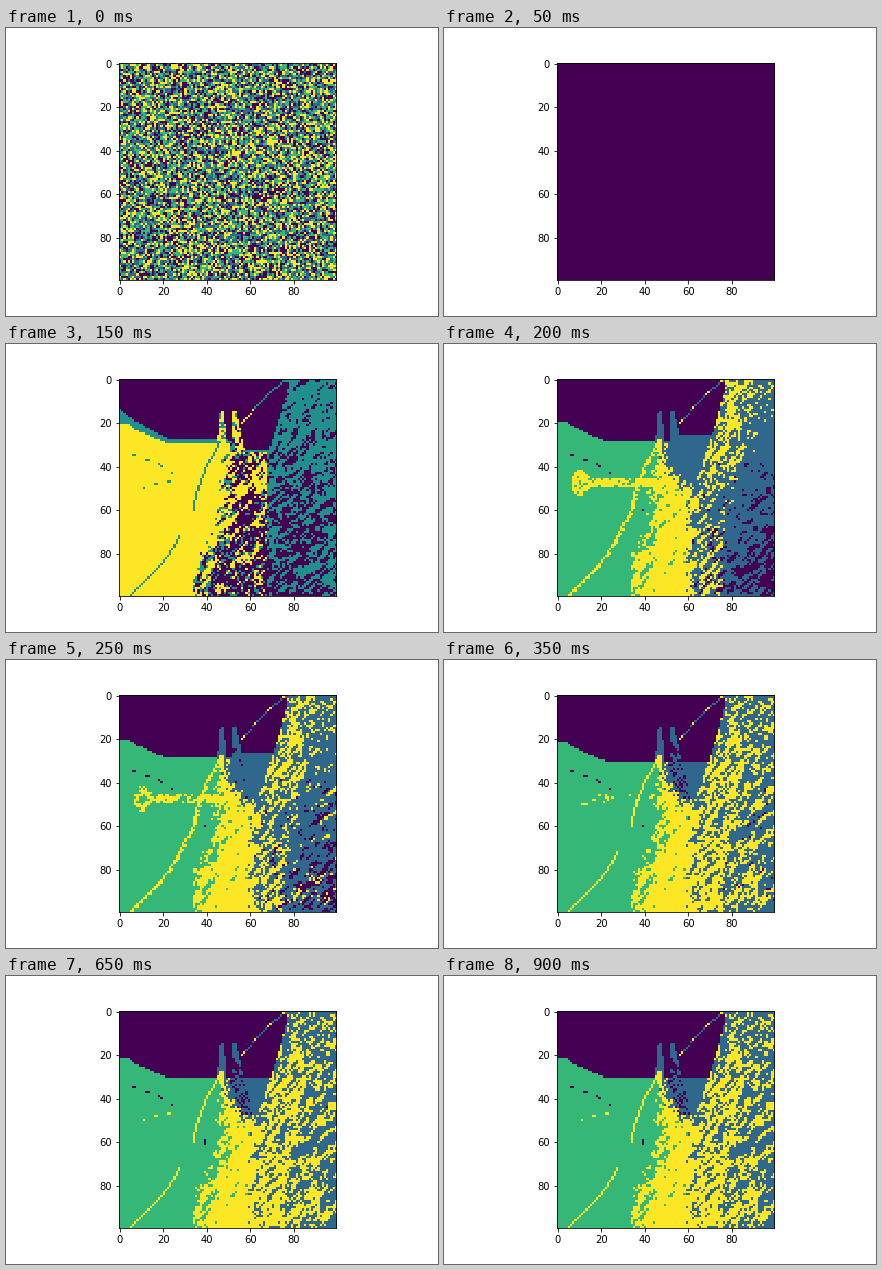
Recreate the animation shown at these times as a matplotlib script. Size 432 px wide and 288 px high, loop 1 s.

```python
import numpy as np
import matplotlib.pyplot as plt
from matplotlib.animation import FuncAnimation

SIZE, FRAMES, INTERVAL = 100, 20, 50
SKY, HAZE, MEADOW, SCRUB = range(4)
rng = np.random.RandomState(7)
Y, X = np.mgrid[:SIZE, :SIZE]


def ramp(v, start, end):
    return np.clip((v - start) / (end - start), 0, 1)


def mix(a, b, t):
    return a + (b - a) * t


def streaks(length, lean):
    """Slanted noise, ranked so that its values spread evenly over 0..1."""
    white = rng.randn(SIZE, SIZE)
    white = white + 0.6 * np.roll(white, 1, 1)
    smear = sum(np.roll(white, (k, -round(k * lean)), (0, 1)) for k in range(length))
    field = 0.5 * rng.randn(SIZE, SIZE) + smear / np.sqrt(length)
    return field.ravel().argsort().argsort().reshape(field.shape) / field.size


def steep_line(top, bottom, column):
    return (X == np.round(column)) & (Y >= top) & (Y <= bottom)


scatter = rng.randint(0, 4, (SIZE, SIZE))
grain, patch = streaks(4, 0.5), streaks(3, 0.8)
fleck = rng.rand(SIZE, SIZE)

# Outlines of the scene
cliff = np.maximum(58, 77 - 15 * (Y / 50) ** 1.3)
rock = X > cliff
horizon = 22 + 8.5 * ramp(X, 4, 22) ** 0.8
haze_end = 48 - 0.07 * (60 - X) ** 2 + 8 * (grain - 0.5)
scrub_edge = 47 - 14 * ramp(Y, 66, 99) ** 1.3
spread = 6 + 14 * ramp(Y, 45, 99)
open_ground = (X >= 34) & (Y > 32)

below_tip = Y - 14
left_tower = (abs(X - 46.7) < 0.6 + 0.1 * below_tip) & (Y > 14) & (Y < 31)
right_tower = (abs(X - 52 - 0.15 * below_tip) < 1 + 0.08 * below_tip) & (Y > 14) & (Y < 36)
towers = left_tower | right_tower
shadow = (abs(X - 51 - 0.27 * (Y - 22)) < 3) & (Y > 21) & (Y < 48)

upper_cable = (Y == np.round(20 * ramp(X, 77, 56) ** 1.2)) & (X > 55) & (X < 78)
mid_cable = steep_line(29, 60, 34 + 12 * ramp(Y, 60, 29) ** 1.6)
gap_cable = steep_line(60, 72, mix(34, 27, ramp(Y, 60, 72)))
low_cable = steep_line(72, 99, 27 - 22 * ramp(Y, 72, 99) ** 1.35)
dark_specks = (Y == np.round(35 + 8 * ramp(X, 6, 24) ** 1.5)) & (X % 6 < 2) & (X > 5) & (X < 25)
light_specks = (Y == np.round(52 - X / 4.5)) & (X % 6 > 3) & (X > 10) & (X < 24)


def three_groups():
    lab = np.full((SIZE, SIZE), 2)
    bright = mix(0.62, 0.24, ramp(Y, 35, 58))
    rough = open_ground & (grain < np.clip(0.5 + (X - scrub_edge - 1) / spread, 0, 1 - bright))
    teal = mix(0.6, 0.2, ramp(X - scrub_edge, 0, 8))
    lab[rough] = (fleck < teal)[rough]

    face = X > np.maximum(cliff, 67)
    share = mix(0.74, 0.36, ramp(Y, 10, 70)) + 0.2 * ramp(X, 75, 99)
    lab[face] = (patch < share)[face]

    band_top = 13.5 + 14 * ramp(X, 0, 22) ** 0.8 + 5 * ramp(X, 48, 58)
    lab[(Y < horizon - 1 + 4 * (X > 50)) & ~rock] = 1
    lab[(Y < band_top) & ~rock] = 0
    lab[towers] = np.where(fleck < 0.6, 2, 1)[towers]
    lab[shadow & (fleck > 0.7)] = 0
    lab[upper_cable | mid_cable | low_cable | dark_specks | light_specks] = 1
    lab[upper_cable & (X < 62)] = 2
    return lab


def four_groups(settled, n):
    fresh = 1 - settled
    lab = np.full((SIZE, SIZE), MEADOW)
    ground = np.clip(0.5 + (X - scrub_edge + 2 * fresh) / spread, 0, 0.95)
    lab[(grain < ground) & open_ground] = SCRUB

    early = 0.07 + 0.58 * np.exp(-(np.maximum(X - cliff, 0) / 16) ** 2)
    late = mix(0.78, 0.38, ramp(X, 62, 95)) * mix(0.65, 1, ramp(Y, 0, 30))
    face = rock & (X + 5 * (fleck - 0.5) > 58)
    lab[face] = np.where(grain < mix(early, late, settled), SCRUB, HAZE)[face]
    dark = 0.55 * ramp(X + 0.7 * Y, 95, 168) ** 2 * fresh
    lab[face & (Y > 38) & (patch < dark) & (lab == HAZE)] = SKY

    # A bright strip of meadow shrinks to a few specks.
    strip = abs(Y - 47.5) < 2 + 4 * np.exp(-((X - 10) / 4) ** 2)
    lab[strip & (X > 6) & (X < 46) & (patch < 0.62 * fresh)] = SCRUB

    haze = (X > 46) & (Y < haze_end) & ~rock
    lab[haze] = np.where((X < 51) & (fleck > 0.5), SCRUB, HAZE)[haze]
    lab[(Y < horizon - fresh * (1.5 + 2 * (X > 54))) & ~rock] = SKY
    lab[towers] = HAZE
    lab[shadow & (fleck < mix(0.08, 0.4, settled))] = SKY
    lab[(abs(X - 46.5) < 1) & (Y > 27) & (Y < 34)] = SCRUB

    lab[upper_cable] = np.where(fleck < 0.2, SCRUB, HAZE)[upper_cable]
    lab[mid_cable | low_cable | light_specks] = SCRUB
    if fresh > 0.5:
        cable = mid_cable | gap_cable | low_cable
        lab[cable | np.roll(cable & (fleck < 0.5), 1, 1)] = SCRUB
    lab[dark_specks] = SKY
    lab[(X == 39) & (abs(Y - 60) < n / 12)] = SKY
    return lab


def labels(n):
    if n == 0:
        return scatter
    if n == 1:
        return np.zeros((SIZE, SIZE), int)
    if n < 4:
        groups = three_groups()
        return groups if n == 3 else (groups == 2).astype(int)
    n = min(n, FRAMES - 2)
    settled = max(-0.35, 1 - 0.35 ** (n - 5)) - 0.02 * ramp(n, 18, 6)
    return four_groups(settled, n)


plt.rcParams["font.family"] = "DejaVu Sans"
fig, ax = plt.subplots(figsize=(6, 4), dpi=72, facecolor="white")
fig.subplots_adjust(left=0.125, right=0.9, bottom=0.125, top=0.88)
image = ax.imshow(labels(0), cmap="viridis", interpolation="nearest", vmin=0, vmax=3)
ax.set_xticks(range(0, SIZE, 20))
ax.set_yticks(range(0, SIZE, 20))
ax.tick_params(labelsize=10)


def update(n):
    lab = labels(n)
    image.set_data(lab)
    image.set_clim(0, max(1, lab.max()))
    return [image]


anim = FuncAnimation(fig, update, frames=FRAMES, interval=INTERVAL, repeat=True, repeat_delay=0)
plt.show()
```
